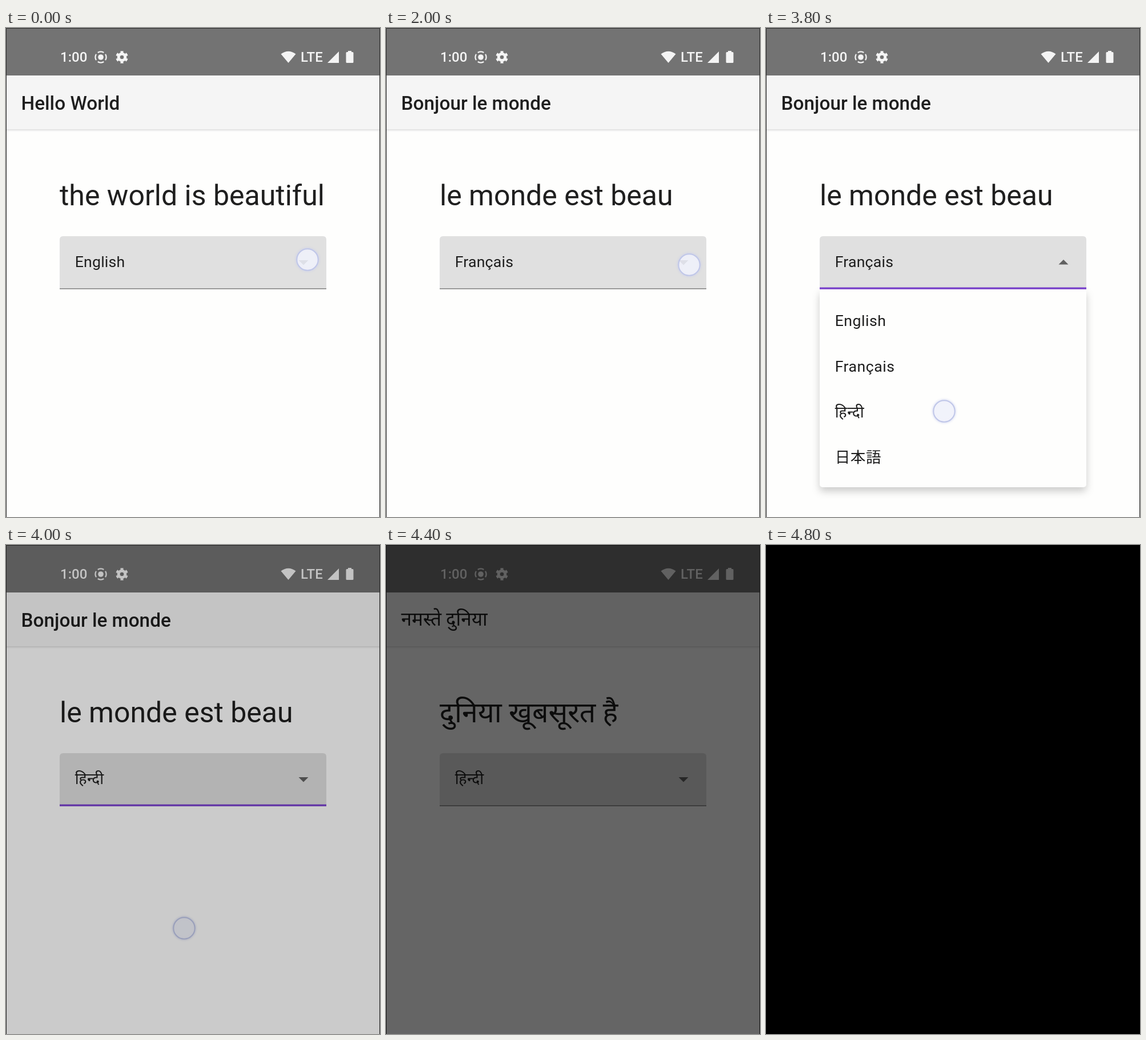
An HTML page for the animation above (5 s loop, 655 px wide and 855 px high).

```html
<!DOCTYPE html>
<html lang="en">
<head>
<meta charset="utf-8">
<style>
  html, body { margin: 0; width: 100%; height: 100%; overflow: hidden; background: #000; }
  svg { display: block; width: 655px; height: 855px; }
  text { font-family: Roboto, "Noto Sans Devanagari", "Noto Sans", "Noto Sans CJK JP", sans-serif; font-size: 26.67px; fill: #1f1f1f; }
  .status { fill: #f4f4f4; }
  .status text { font-size: 24px; font-weight: 500; fill: #f4f4f4; }
  .status .ring { fill: none; stroke: #f4f4f4; }
  #title { font-size: 33.33px; font-weight: 500; }
  #heading { font-size: 50px; }
  #value { letter-spacing: .2px; }
  #menu text { letter-spacing: .5px; }
  #menu rect { filter: drop-shadow(0 7px 7px #0003); }
  #touch { filter: drop-shadow(0 0 2px #c3c9ee); }
</style>
</head>
<body>
<svg viewBox="0 0 655 855">
  <rect width="655" height="855" fill="#fefefd"/>
  <rect y="177" width="655" height="2" fill="#e4e4e4"/>
  <rect y="179" width="655" height="2" fill="#f6f6f6"/>
  <rect y="83" width="655" height="94" fill="#f5f5f5"/>
  <rect width="655" height="83" fill="#737373"/>

  <g class="status">
    <text x="95" y="59">1:00</text>
    <circle cx="166" cy="51" r="4.8"/>
    <circle class="ring" cx="166" cy="51" r="9.6" stroke-width="2.2" pathLength="4" stroke-dasharray=".74 .26" stroke-dashoffset=".37"/>
    <circle class="ring" cx="203" cy="51" r="5.8" stroke-width="5"/>
    <circle class="ring" cx="203" cy="51" r="9" stroke-width="3.6" pathLength="6" stroke-dasharray=".52 .48" stroke-dashoffset=".26" transform="rotate(-90 203 51)"/>
    <path d="M494.5 61 481.5 45.5Q494.5 36 507.5 45.5Z"/>
    <text x="516" y="59">LTE</text>
    <path d="M563 61H583V41Z"/>
    <path d="M599 40h6v2h2q1.500 0 1.500 1.500v16q0 1.500-1.500 1.500h-10q-1.500 0-1.500-1.500v-16q0-1.500 1.500-1.500h2z"/>
  </g>

  <text id="title" x="26.500" y="143"></text>
  <text id="heading" x="94" y="310"></text>

  <path d="M94 456V370q0-6 6-6H555q6 0 6 6V456Z" fill="#e0e0e0"/>
  <rect id="line" x="94" width="467"/>
  <text id="value" x="120.700" y="418"></text>
  <circle id="ripple" cx="521" cy="410" r="40" fill="#000"/>
  <path id="arrow" d="M512.500 406H529.500L521 414.500Z" fill="#616161"/>

  <g id="menu">
    <rect x="94" y="457" width="467" height="346" rx="5" fill="#fefefd"/>
    <text x="120.700" y="521">English</text>
    <text x="120.700" y="601">Français</text>
    <text x="120.700" y="681" lang="hi">हिन्दी</text>
    <text x="120.700" y="760" lang="ja">日本語</text>
  </g>

  <circle id="touch" r="18.700" fill="#fff" fill-opacity=".65" stroke="#bfc6e8" stroke-width="2"/>
  <path d="M.5 855V.5H654.500V855" fill="none" stroke="#2a2a2a"/>
  <rect id="dim" width="655" height="855"/>
</svg>
<script>
const LOOP = 5000, STEP = 200;
const $ = id => document.getElementById(id);

const languages = [
  { value: 'English', title: 'Hello World', heading: 'the world is beautiful', titleY: 143 },
  { value: 'Français', title: 'Bonjour le monde', heading: 'le monde est beau', titleY: 143 },
  { value: 'हिन्दी', title: 'नमस्ते दुनिया', heading: 'दुनिया खूबसूरत है', titleY: 141 },
];

// page: language of the page; value: language in the field, when it is ahead of the page
const states = [
  { at: 0, page: 0, touch: [528, 405] },
  { at: 400, page: 0 },
  { at: 600, page: 0, menu: .75, ripple: .06 },
  { at: 800, page: 0, menu: 1, ripple: .1 },
  { at: 1200, page: 0, menu: 1 },
  { at: 1400, page: 0, menu: 1, touch: [312, 595] },
  { at: 1600, page: 0, value: 1, touch: [312, 595] },
  { at: 1800, page: 1 },
  { at: 2000, page: 1, touch: [531, 414] },
  { at: 3000, page: 1 },
  { at: 3200, page: 1, menu: .75, ripple: .06 },
  { at: 3400, page: 1, menu: 1, ripple: .1 },
  { at: 3800, page: 1, menu: 1, touch: [312, 670] },
  { at: 4000, page: 1, value: 2, touch: [312, 670] },
  { at: 4200, page: 2 },
];

function set(id, attributes) {
  for (const name in attributes) $(id).setAttribute(name, attributes[name]);
}

function render(time) {
  const t = Math.floor(time % LOOP / STEP) * STEP;
  const { page, value = page, menu = 0, ripple = 0, touch } = states.findLast(s => s.at <= t);
  const language = languages[page];
  const focused = menu > 0 || value !== page;

  $('title').textContent = language.title;
  $('heading').textContent = language.heading;
  $('value').textContent = languages[value].value;
  set('title', { y: language.titleY });
  set('line', focused
    ? { y: 453.5, height: 3.3, fill: '#7b42cf' }
    : { y: 455, height: 1.7, fill: '#8b8b8b' });
  set('arrow', { transform: menu ? 'rotate(180 521 409.7)' : '' });
  set('ripple', { opacity: ripple });
  set('menu', { opacity: menu });
  set('touch', { opacity: touch ? 1 : 0, transform: `translate(${touch || [0, 0]})` });
  set('dim', { opacity: Math.max(0, (t - 3800) / 1000) });
}

function tick() {
  render(performance.now());
  requestAnimationFrame(tick);
}
tick();
</script>
</body>
</html>
```
